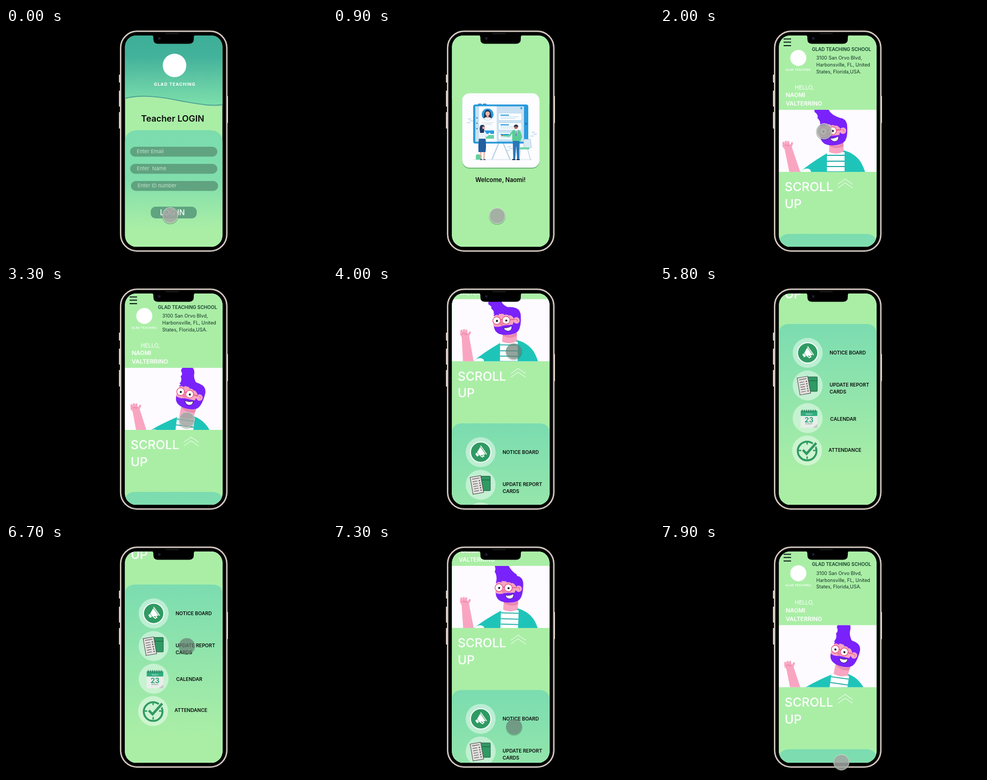
These frames come from a looping animation (600x430 px, 8 s). An HTML page:

```html
<!DOCTYPE html>
<html lang="en">
<head>
<meta charset="utf-8">
<style>
html, body { margin: 0; width: 100%; height: 100%; overflow: hidden; background: #000; }
svg { display: block; width: 600px; height: 430px; }
text { font-family: Inter, "Open Sans", sans-serif; white-space: pre; }
</style>
</head>
<body>
<svg id="stage" viewBox="0 0 600 430"></svg>
<script>
const GREEN = '#aaeea6', TEAL = '#1fc4b9', PURPLE = '#7a22fb', PINK = '#f9a5c2', LEAF = '#2f9a63', BLUE = '#2a9bdc';

// Markup helpers; text is placed by the middle of its capitals.
const text = (x, y, size, str, fill = '#0a0a0a', weight = 600, extra = '') =>
  `<text x="${x}" y="${y + size * .36}" font-size="${size}" fill="${fill}" font-weight="${weight}" ${extra}>${str}</text>`;
const box = (x, y, w, h, fill, r = 0, extra = '') =>
  `<rect x="${x}" y="${y}" width="${w}" height="${h}" rx="${r}" fill="${fill}" ${extra}/>`;
const dot = (x, y, r, fill, extra = '') => `<circle cx="${x}" cy="${y}" r="${r}" fill="${fill}" ${extra}/>`;
const path = (d, fill, extra = '') => `<path d="${d}" fill="${fill}" ${extra}/>`;
const line = (d, stroke, width = 1, extra = '') =>
  `<path d="${d}" fill="none" stroke="${stroke}" stroke-width="${width}" ${extra}/>`;
const gradient = (id, y1, y2, ...stops) =>
  `<linearGradient id="${id}" gradientUnits="userSpaceOnUse" x1="0" x2="0" y1="${y1}" y2="${y2}">` +
  stops.map(([at, color]) => `<stop offset="${at}" stop-color="${color}"/>`).join('') + '</linearGradient>';
const round = 'stroke-linecap="round" stroke-linejoin="round"';
const middle = 'text-anchor="middle"';

const defs = `<defs>
  ${gradient('header', 14, 145, [0, '#3eae98'], [.3, '#43b29b'], [.7, '#66cca5'], [1, '#7cdfab'])}
  ${gradient('form', 191, 375, [0, '#7bdcae'], [.5, '#80deac'], [1, GREEN])}
  ${gradient('menu', 385, 665, [0, '#7bdcb0'], [1, GREEN])}
  <clipPath id="screen">${box(222.5, 14, 182, 395, '#fff', 21)}</clipPath>
  <clipPath id="picture">${box(222, 153, 183, 116, '#fff')}</clipPath>
</defs>`;

const button = (x, y, h) => box(x, y, 2.5, h, '#d3c8bf', 1);
const phone = button(211, 87, 15) + button(211, 117, 30) + button(211, 157, 31) + button(412.5, 127, 51) + `
  ${box(214.2, 6, 198.6, 411, '#000', 31, 'stroke="#dcd2ca" stroke-width="2.5"')}
  ${box(216, 7.8, 195, 407.4, 'none', 29, 'stroke="#4a4541" stroke-width=".8"')}`;

const notch = `
  ${path('M272 13H354Q351 14 351 18V21Q351 29.5 342 29.5H284Q275.5 29.5 275.5 21V18Q275.5 14 272 13Z', '#000')}
  ${box(298, 9.5, 25, 2, '#1c1c1e', 1)}${dot(286.5, 19.5, 3, '#11131f')}${dot(286.5, 19.5, 1.2, '#252b50')}`;

const field = (x, y, label) => box(x, y, 163, 18.5, '#60a380', 9.2) + text(x + 12.5, y + 9, 9.5, label, '#c3e3cc', 400);
const wave = 'C385 147 360 142 330 137C292 129 252 123 222 132';
const login = `
  ${box(222, 14, 183, 395, GREEN)}
  ${path('M222 14H405V143' + wave + 'Z', 'url(#header)')}
  ${line('M405 144.5' + wave, '#83bd9b', 2.2, 'opacity=".6"')}
  ${line('M405 143' + wave, '#3f9f97', 1.3)}
  ${dot(315, 70, 22, '#fff')}
  ${text(315.5, 105, 8, 'GLAD TEACHING', '#fff', 700, middle + ' letter-spacing=".9"')}
  ${text(311.5, 169, 16.2, 'Teacher LOGIN', '#0a0a0a', 600, middle)}
  ${path('M222 409V216Q222 191 247 191H380Q405 191 405 216V409Z', 'url(#form)')}
  ${field(232, 222, 'Enter Email')}${field(232, 254, 'Enter  Name')}${field(233.5, 286, 'Enter ID number')}
  ${box(270.5, 334, 86, 22, '#60a380', 9)}
  ${text(311, 345, 13.9, 'LOG IN', '#fff', 500, middle)}`;

const infoCard = y => box(310, y, 42, 12, '#fff', 1) +
  line(`M313 ${y + 3}h16`, BLUE, 1.8) + line(`M313 ${y + 6}h34M313 ${y + 9}h28`, '#a6d3e8', 1);
const bricks = (x, y) => line(`M${x} ${y}h6M${x + 3} ${y + 3.5}h7M${x - 2} ${y + 7}h6`, '#c8e0ef', 2);
const welcome = `
  ${box(222, 14, 183, 395, GREEN)}
  ${box(241.5, 124, 144.5, 139, '#5fa570', 14, 'opacity=".7"')}
  ${box(241.5, 122, 144.5, 139, '#fdfcff', 14)}
  ${bricks(252, 170)}${bricks(371, 195)}${bricks(326, 222)}
  ${line('M262 246H372', '#b9d3e2', .8)}
  ${line('M310 215L297 246M318 215L331 246', '#b4d1e2', 2)}
  ${box(271, 141.5, 7, 3, '#1c7cba', 1)}${box(280, 141.5, 7, 3, '#1c7cba', 1)}
  ${box(262, 143, 103, 73, BLUE, 4)}
  ${box(266, 146.5, 91, 66, '#c9e1f1')}${box(273, 146.5, 33, 66, '#fbfcff')}
  ${dot(269, 168, 1.3, '#287db7')}${dot(269, 178, 1.3, '#287db7')}${dot(269, 188, 1.3, '#287db7')}
  ${dot(361, 179, 2.2, '#1a78b5')}${dot(352, 150, 2, '#4aa9de')}
  ${dot(289, 161.5, 11, BLUE)}
  ${path('M282 169Q282 153 289 153Q296 153 296 169Z', '#20365c')}
  ${path('M281 169.5Q289 163 297 169.5Q289 175 281 169.5Z', '#f3f8fb')}
  ${box(287, 163, 4, 5, '#e99b8b', 1)}${dot(289, 160, 4, '#f4b5a5')}
  ${line('M278 177h22M281 180h16', '#c6dbe8', 1.2)}
  ${box(276, 191.5, 25, 6.5, BLUE, 1)}${box(276, 200, 25, 7, '#67d3a5', 1)}
  ${infoCard(160)}${infoCard(178)}${infoCard(196)}
  ${box(267, 237, 9, 9, '#5cd2a0', 1)}${line('M269 238q3 -5 5 0', '#42ae83', .8)}
  ${line('M276 229L277 245M283 229L282 245', '#eba391', 2)}
  ${line('M275 246h4M281 246h4', '#23405f', 1.6)}
  ${path('M273 206H285Q287 221 285 232H272Q271 217 273 206Z', '#225f9f')}
  ${path('M274 193Q279 189 284 193L286 207H273Z', '#e9f2f9')}
  ${line('M284 195L287 202L293 197', '#e9f2f9', 2.6, round)}
  ${path('M275 196Q272 181 279 181Q285 181 283 188L282 196Z', '#203963')}${dot(281.5, 186.5, 2.5, '#f0ad9d')}
  ${path('M356 208L369 208L371 224H357Z', '#dceaf3', 'stroke="#9fc5da" stroke-width=".8"')}
  ${box(349, 223, 18, 4, '#72d6aa', 1)}${line('M351 227L348 246M364 227L369 246', '#a8c8d9', 1)}
  ${path('M336 211H349L348 245H344L342.5 220L340.5 245H337Z', '#2877b8')}
  ${line('M335 246h6M343 246h6', '#1f3554', 1.8)}
  ${path('M335 192Q342 188 349 192L351 211H335Z', '#58cd96')}
  ${path('M340 190h5l-2 14z', '#f3f8fa')}${line('M342.5 192v10', '#245b91', 1.2)}
  ${line('M336 194L329 202L318 201', '#58cd96', 3, round)}${dot(316, 201, 1.5, '#b46a55')}
  ${line('M349 194L352 203L349 211', '#58cd96', 3, round)}
  ${dot(342, 185.5, 3.3, '#b46a55')}${path('M338 185Q338 180 343 180.5Q347 181 345.5 186Q343 183 338 185Z', '#26364f')}
  ${text(313, 284, 11.1, 'Welcome, Naomi!', '#0a0a0a', 600, middle)}`;

const eye = (x, y) => dot(x, y, 7.2, '#fff', 'stroke="#e0507e" stroke-width="1.3"') + dot(x + .5, y + .5, 1.9, '#120c20');
const man = `
  <g id="arm">
    ${path('M236 222Q243 220 250 222L268 290H245Z', PINK)}
    ${line('M235 220V213M239.5 219V211.5M244 219V212M248 221L251 215', PINK, 4, round)}
    ${path('M233 216Q242 211 250 219Q251 227 243 229Q234 227 233 216Z', PINK)}
    ${line('M237 219q3 -3 5 0q3 -2 4 1', '#d7668f', .8)}
  </g>
  <g id="body">
    ${path('M255 275Q275 256 314 233Q328 226 344 229Q360 233 371 245Q383 258 391 300H240Z', TEAL)}
    ${path('M262 269Q272 259 281 265L285 277H258Z', '#fff')}
    ${path('M312 232H345V300H312Z', '#fff')}
    ${line('M312 238H345M312 249H345M312 259H345M312 269H345M312 279H345', '#24aaa8', 1.8)}
    ${path('M317 208H343V231Q330 238 316 232Z', PINK)}
  </g>
  <g id="head">
    ${path('M317 212H343V229Q331 237 317 231Z', PINK)}
    ${path('M317 217Q330 224 343 215V221Q330 228 317 221Z', '#e989ae')}
    <g id="quiff">${path('M299 183Q301 174 294 168Q297 163 289 157Q287 144 298 139Q310 137 314 150Q318 162 336 168L336 183Z', PURPLE)}</g>
    ${path('M300 186Q300 174 312 170Q328 165 341 169Q350 173 350 185Q351 203 346 211Q340 219 323 219.5Q302 220 300 204Z', PURPLE)}
    ${path('M300 184Q310 178 322 181Q334 181 338 190L335 200Q324 201 317 202Q306 207 299 203Z', PINK)}
    ${dot(342, 192, 6, PINK)}${line('M340 190q4 -1 4 4', '#d9648f', 1)}
    ${eye(305, 193)}${eye(322.5, 192)}
    ${line('M312 192q2 -2 4 0M330 191L339 190', '#e04a78', 1.3)}
    ${line('M300 183q4 -3 8 -1M319 181q5 -2 9 1', PURPLE, 2, round)}
    ${path('M313 194Q308 202 315 202Q319 200 317 196Z', '#ef83a7')}
    ${path('M318 206Q327 207 333 202Q335 210 328 212Q321 213 318 206Z', '#fff', 'stroke="#24104c" stroke-width=".8"')}
  </g>`;

const badge = (x, y, art) => `<g transform="translate(${x} ${y})">${dot(0, 0, 28, '#fff', 'opacity=".45"')}${art}</g>`;
const ticks = [0, 90, 180, 270].map(a => line('M0 -16V-11', LEAF, 2.5, `transform="rotate(${a})"`)).join('');
const megaphone = dot(0, 0, 19, LEAF, 'stroke="#fff" stroke-width="1.8"') +
  `<g transform="rotate(-35) scale(.85)">${path('M-7 -4L6 -10V10L-7 4Z', '#fff')}${box(-12, -4, 5, 8, '#fff', 2)}
  ${line('M-5 5L-3 11H1L0 7', '#fff', 2)}${line('M8 -11V11', '#fff', 1.8, round)}${line('M-6.5 -4V4', LEAF, .8)}</g>`;
const report = box(0, -16, 18, 27, LEAF, 1, 'stroke="#20583f" stroke-width="1"') + line('M0 -9H18', '#20583f', 1) +
  `<g transform="rotate(-10)">${box(-17, -17, 20, 32, '#e4e1df', 0, 'stroke="#4b4b4b" stroke-width="1"')}
  ${line('M-14 -13H0', '#666', 1.3)}` +
  [0, 1, 2, 3, 4].map(i => line(`M-14 ${-8 + i * 4.5}h9`, '#666', 1.2) + dot(-1, -8 + i * 4.5, 1.2, '#4b4b4b')).join('') + '</g>';
const calendar = box(-13, -14, 31, 32, '#e9eeea', 1) + path('M9 18L18 11V18Z', '#c3cdc8') +
  box(-13, -14, 31, 10, '#31ad7f', 1) +
  line('M-10 -16v5M-6 -16v5M-2 -16v5M2 -16v5M6 -16v5M10 -16v5M14 -16v5', '#246f54', 1.3) +
  text(2.5, -7, 3.2, 'MARCH', '#bfe9d5', 600, middle) + text(2.5, 3.5, 13, '23', '#31a37a', 700, middle) +
  text(2.5, 11, 3, 'MONDAY', '#76a592', 600, middle);
const attendance = dot(0, 1, 17.5, 'none', `stroke="${LEAF}" stroke-width="3.6"`) + ticks +
  line('M-8 -1L-1 6L17 -14', '#cfeed3', 8) + line('M-8 -1L-1 6L17 -14', LEAF, 4.5);

const address = ['3100 San Orvo Blvd,', 'Harbonsville, FL, United', 'States, Florida,USA.'];
const home = `
  ${box(222, 14, 183, 395, GREEN)}
  <g id="page">
    ${line('M231 20.5H245M231 26.5H245M231 33H245', '#10251b', 1.9)}
    ${dot(258.5, 56, 15, '#fff')}
    ${text(258.5, 78.5, 5, 'GLAD TEACHING', '#fff', 600, middle + ' letter-spacing=".5"')}
    ${text(284, 39.5, 8.7, 'GLAD TEACHING SCHOOL', '#0f3d29')}
    ${address.map((s, i) => text(292, 56 + i * 12.7, 8.95, s, '#123323', 400)).join('')}
    ${text(252, 111, 10.3, 'HELLO,', '#fff', 400)}
    ${text(235, 125.5, 10.7, 'NAOMI', '#fff')}${text(235, 141, 10.9, 'VALTERRINO', '#fff')}
    ${box(222, 153, 183, 116, '#fdfbff')}
    <g clip-path="url(#picture)">${man}</g>
    ${text(233, 297, 23.1, 'SCROLL', '#fff', 500)}${text(233, 328.5, 23.1, 'UP', '#fff', 500)}
    ${line('M332.5 292L346 282.5L360 292M332.5 299L346 289.5L360 299', '#fff', 1)}
    ${path('M222 900V405Q222 385 242 385H385Q405 385 405 405V900Z', 'url(#menu)')}
    ${badge(276, 439, megaphone)}${badge(276, 500, report)}${badge(276, 561, calendar)}${badge(275, 621.5, attendance)}
    ${text(317, 439, 9, 'NOTICE BOARD')}${text(317, 499, 9, 'UPDATE REPORT')}
    ${text(317, 511.7, 9, 'CARDS')}${text(318, 562.3, 9, 'CALENDAR')}${text(315, 620.3, 9, 'ATTENDANCE')}
  </g>`;

const stage = document.getElementById('stage');
stage.innerHTML = `${defs}${phone}
  <g clip-path="url(#screen)">
    <g id="login">${login}</g><g id="welcome">${welcome}</g><g id="home">${home}</g>
  </g>${notch}
  <g id="touch">${dot(0, 1.5, 15.5, '#35513d', 'opacity=".3"')}<circle id="tip" r="14.5"/></g>`;
const part = id => document.getElementById(id);
const move = (id, value) => part(id).setAttribute('transform', value);

// Keys are [time, value]; straight lines between them.
function track(keys, t) {
  const i = keys.findIndex(k => k[0] > t);
  if (i < 0) return keys[keys.length - 1][1];
  if (!i) return keys[0][1];
  const [t0, a] = keys[i - 1], [t1, b] = keys[i];
  return a + (b - a) * (t - t0) / (t1 - t0);
}
const scrollKeys = [[3500, 0], [3700, 30], [4000, 128], [4300, 235], [4500, 290], [4800, 314], [6600, 314],
  [6700, 309.5], [7000, 225], [7400, 75], [7700, 9], [7900, 1.3]];
const touchX = [[2500, 307], [3300, 338], [6700, 338], [7900, 339]];
const touchY = [[0, 350], [900, 351], [1300, 351], [1900, 193], [2500, 193], [3300, 250], [3500, 250], [3700, 220],
  [4000, 122], [4500, 17], [4700, -20], [6000, -20], [6400, 186], [6600, 186], [6700, 190], [7000, 260],
  [7400, 368], [7700, 404], [7900, 408]];

function poseMan(t) {
  const turn = t / 2360 * 2 * Math.PI;
  const sway = ((1 - Math.cos(turn)) / 2) ** 2;
  const swing = 1 - 5 * Math.cos(t / 1450 * 2 * Math.PI);
  const stretch = 1 + .4 * Math.sin(turn);
  move('body', `translate(${6 * sway} ${14 * sway}) rotate(${8 * sway} 332 250)`);
  move('head', `translate(${9 * sway} ${12 * sway}) rotate(${20 * sway} 332 228)`);
  move('quiff', `translate(311 176) rotate(${12 * sway}) scale(1 ${stretch}) translate(-311 -176)`);
  move('arm', `translate(${3 * sway} ${9 * sway}) rotate(${swing} 255 275)`);
}

function draw(now) {
  const t = now % 8000;
  part('welcome').setAttribute('opacity', Math.min(1, Math.max(0, (t - 200) / 300)));
  part('home').style.display = t < 1900 ? 'none' : '';
  move('page', `translate(0 ${-track(scrollKeys, t)})`);
  poseMan(t - 2000);

  const drag = t > 3500 && t < 4800 || t > 6500 && t < 7700;
  move('touch', `translate(${track(touchX, t)} ${track(touchY, t)})`);
  part('tip').setAttribute('fill', drag ? 'rgba(116,136,128,.58)' : 'rgba(170,172,170,.8)');
  part('tip').setAttribute('stroke', drag ? 'none' : 'rgba(225,230,225,.8)');
  requestAnimationFrame(draw);
}
requestAnimationFrame(draw);
</script>
</body>
</html>
```
